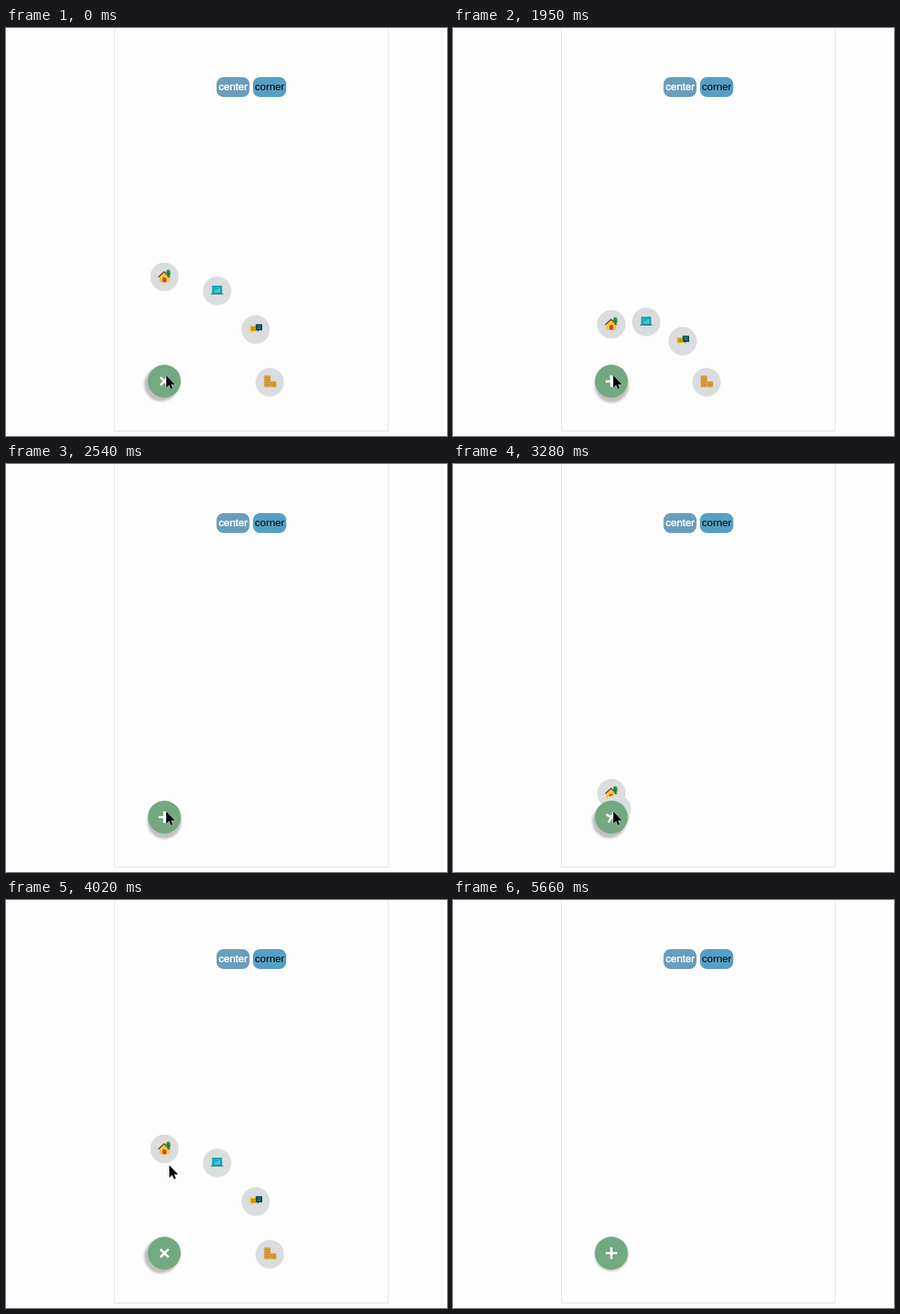
These frames come from a looping animation (575 by 532 pixels, 5.81 s). An HTML page:

```html
<!DOCTYPE html>
<html lang="en">
<head>
<meta charset="utf-8">
<title>Corner menu</title>
<style>
html, body { margin: 0; width: 100%; height: 100%; overflow: hidden; background: #fdfdfd; }
svg { display: block; width: 100vw; height: 100vh; }
text { font: 13.6px "Liberation Sans", Arial, sans-serif; text-anchor: middle; }
</style>
</head>
<body>
<svg viewBox="0 0 575 532">
  <defs>
    <filter id="soft" x="-30%" y="-30%" width="160%" height="160%"><feGaussianBlur stdDeviation="1.7"/></filter>
    <filter id="slight" x="-30%" y="-30%" width="160%" height="160%"><feGaussianBlur stdDeviation="0.8"/></filter>
  </defs>
  <rect width="575" height="532" fill="#fdfdfd"/>
  <path d="M141.5 0V525.5H498.5V0" fill="none" stroke="#e3e3e3"/>

  <rect x="274.5" y="64" width="43" height="26" rx="9" fill="#6a9dba"/>
  <rect x="322" y="64" width="43.5" height="26" rx="9" fill="#569fc4"/>
  <text x="296.2" y="81" fill="#fff" stroke="#fff" stroke-width=".45">center</text>
  <text x="343.8" y="81" fill="#000">corner</text>

  <g id="items">
    <g class="item">
      <path d="M-6.5 0L0-6.5 6.5 0V7.5H-6.5Z" fill="#f3c53c"/>
      <path d="M-2.5 7.5V1.5H2.5V7.5Z" fill="#d8402f"/>
      <path d="M-8 1L-.5-6 7 1" fill="none" stroke="#7c3a1e" stroke-width="1.6"/>
      <path d="M5 1V-5" stroke="#6b4a22" stroke-width="1.2"/>
      <ellipse cx="5" cy="-4.5" rx="3" ry="4.5" fill="#3f9a45"/>
      <path d="M5 0V-7M5-2L7-4M5-3L3-5" fill="none" stroke="#1f5b2c" stroke-width=".8"/>
    </g>
    <g class="item">
      <rect x="-6.5" y="-6.5" width="13" height="10.5" rx=".8" fill="#1a98a6"/>
      <rect x="-5.3" y="-5.3" width="10.6" height="8" fill="#12b3c3"/>
      <path d="M-2.5 2.5V0M0 2.5V-1.5M2.5 2.5V-3" stroke="#7fdce2" stroke-width="1.3"/>
      <rect x="-8" y="3.5" width="16" height="1.6" rx=".8" fill="#337f8a"/>
    </g>
    <g class="item">
      <path d="M-7.5-4.5H1.5V3H-3L-5 5V3H-7.5Z" fill="#f0b91d"/>
      <path d="M-5.5-1.8H-1M-5.5 .5H-1" stroke="#85640f"/>
      <path d="M0-6.5H8.5V1.5H4.5L2.5 3.5V1.5H0Z" fill="#0b4450"/>
      <path d="M2-4H6.5M2-1.5H6.5" stroke="#58a5a8"/>
    </g>
    <g class="item">
      <rect x="-7.5" y="-8.5" width="8.5" height="15.5" rx="1.4" fill="#dba23c"/>
      <rect x="1" y="-1" width="7.5" height="8" rx="1.4" fill="#dba23c"/>
      <path d="M-7-5.5H.5M-7-2.5H.5M-7 .5H.5M-7 3.5H.5M1.5 1.5H8M1.5 4.2H8" stroke="#b37c22" stroke-width=".8"/>
    </g>
  </g>

  <g id="button">
    <circle id="shadow" r="22.3" fill="#000"/>
    <circle r="21.5" fill="#73a980"/>
    <path d="M-7.5 0H7.5M0-7.5V7.5" stroke="#fff" stroke-width="3"/>
  </g>

  <path id="cursor" d="M0 0V16L3.7 12.6 6.1 18 8.5 17 6.2 11.7H11.4Z" fill="#000" stroke="#fff" stroke-width="1" paint-order="stroke"/>
</svg>
<script>
const LOOP = 5810, REST = 137.5, HUB = { x: 206.5, y: 460.5 };
const SVG = "http://www.w3.org/2000/svg";
const $ = id => document.getElementById(id);

// The picture advances in these discrete moments.
const ticks = [0, 1050, 1950, 2090, 2240, 2390, 2540, 3280, 3430, 3580, 3730,
  3870, 4020, 4170, 4320, 4470, 4620, 4770, 4910, 5060, 5210, 5660];
const closing = ticks.slice(2, 6), opening = ticks.slice(7, 12);

// Distance of each item from the hub while the fan folds and springs back.
const fans = [
  { fold: [75.5, 30, 3, 0], spring: [32.5, 116, 150.5, REST, REST] },
  { fold: [90.7, 40, 8, 0], spring: [14, 95, 159, REST, REST] },
  { fold: [107.3, 53, 14, 0], spring: [6, 66, 163.5, 144, REST] },
  { fold: [124, 66, 22, 0], spring: [3, 45, 150, 144, REST] }
];
const pairs = (times, values) => times.map((t, i) => [t, values[i]]);
const radii = fans.map(f => [[1050, REST], ...pairs(closing, f.fold), [2540, 0], ...pairs(opening, f.spring)]);
const turn = [[1050, 45], [1950, -4], [2090, 0], [2540, 0], [3280, 28], [3430, 45],
  [4770, 45], [4910, 28], [5060, 8], [5210, 0]];
const fade = [[4320, 1], [4470, .6], [4620, .12], [4770, 0]];
const cursorX = [[3730, 209], [3870, 228], [4020, 213], [4170, 199], [4320, 200]];
const cursorY = [[3730, 453], [3870, 356], [4020, 346], [4170, 321], [4320, 319], [4770, 319], [4910, 320]];

function at(track, t) {
  const next = track.findIndex(k => k[0] > t);
  if (next === 0) return track[0][1];
  if (next < 0) return track[track.length - 1][1];
  const [t0, a] = track[next - 1], [t1, b] = track[next];
  return a + (b - a) * (t - t0) / (t1 - t0);
}

function disc(cy, r, fill) {
  const c = document.createElementNS(SVG, "circle");
  c.setAttribute("cy", cy);
  c.setAttribute("r", r);
  c.setAttribute("fill", fill);
  return c;
}

const items = [...document.querySelectorAll(".item")];
items.forEach(g => g.prepend(disc(.7, 18.6, "#e4e2de"), disc(0, 18.2, "#d9dddf")));

function draw(time) {
  const t = ticks.filter(k => k <= time).pop();
  items.forEach((g, i) => {
    const r = at(radii[i], t), a = i * Math.PI / 6;
    const x = HUB.x + r * Math.sin(a), y = HUB.y + 1 - r * Math.cos(a);
    g.setAttribute("transform", `translate(${x} ${y})`);
  });
  $("items").setAttribute("opacity", at(fade, t));
  $("button").setAttribute("transform", `translate(${HUB.x} ${HUB.y}) rotate(${at(turn, t)})`);

  const hover = t < 4470;
  $("shadow").setAttribute("cy", hover ? 5.8 : 1.3);
  $("shadow").setAttribute("opacity", hover ? .24 : .2);
  $("shadow").setAttribute("filter", hover ? "url(#soft)" : "url(#slight)");

  $("cursor").setAttribute("transform", `translate(${at(cursorX, t)} ${at(cursorY, t)})`);
  $("cursor").setAttribute("visibility", t < 5210 ? "visible" : "hidden");
}

const start = performance.now();
function loop() {
  draw((performance.now() - start) % LOOP);
  requestAnimationFrame(loop);
}
loop();
</script>
</body>
</html>
```
